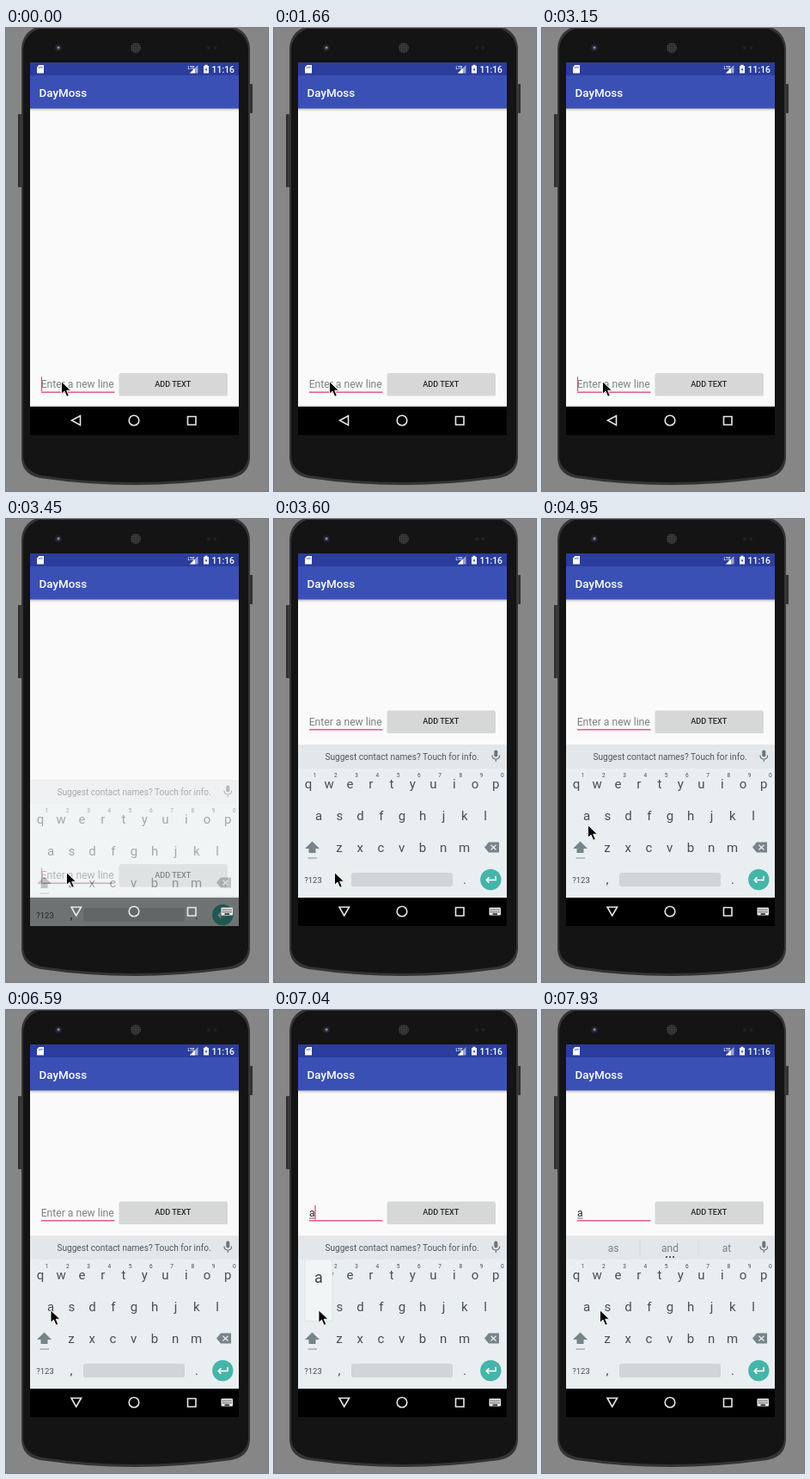
These frames come from a looping animation (305 by 538 pixels, 8 s). An HTML page:

```html
<!DOCTYPE html>
<html lang="en">
<head>
<meta charset="utf-8">
<title>Phone list demo</title>
<style>
  html, body { margin: 0; width: 100%; height: 100%; overflow: hidden; background: #868686; }
  svg { display: block; width: 100vw; height: 100vh; }
  text { font-family: Roboto, sans-serif; white-space: pre; }
  .mid { text-anchor: middle; }
  .medium { font-weight: 500; }
  #nav, .line { fill: none; stroke: #e8e8e8; stroke-width: 1.6; }
</style>
</head>
<body>
<svg viewBox="0 0 305 538">
  <defs>
    <clipPath id="screen"><path d="M28 40H271V473H28Z"/></clipPath>
    <linearGradient id="shade" x2="0" y2="1">
      <stop stop-color="#000" stop-opacity=".25"/>
      <stop offset="1" stop-color="#000" stop-opacity="0"/>
    </linearGradient>
    <pattern id="mesh" width="2" height="2" patternUnits="userSpaceOnUse">
      <path d="M0 0H2V2H0Z" fill="#292929"/><path d="M0 0H1V1H0Z" fill="#565656"/>
    </pattern>
  </defs>

  <!-- Phone -->
  <path d="M0 0H305V538H0Z" fill="#868686"/>
  <path d="M14 100H19V185H14ZM283 65H287V99H283Z" fill="#3a3a3a"/>
  <path d="M15 101V184M286 66V98" stroke="#222"/>
  <path d="M18 500V24Q19 5 36 -1H266Q283 5 284 24V500Q283 519 262 523Q150 539 40 523Q19 519 18 500Z" fill="#343434"/>
  <path d="M20 498V25Q21 8 38 1H264Q281 8 282 25V498Q281 515 261 520Q150 536 41 520Q21 515 20 498Z" fill="#141414"/>
  <circle cx="61" cy="23" r="4" fill="#22222c"/>
  <circle cx="61" cy="23" r="2" fill="#55587c"/>
  <circle cx="61.3" cy="22.6" r=".8" fill="#b0b3cc"/>
  <circle cx="151" cy="23" r="6" fill="url(#mesh)"/>
  <circle cx="236" cy="23" r="2" fill="#271f1f"/>
  <circle cx="243.500" cy="23" r="2" fill="#271f1f"/>

  <g clip-path="url(#screen)">
    <path d="M28 40H271V473H28Z" fill="#fafafa"/>
    <path d="M28 93H271V97H28Z" fill="url(#shade)"/>
    <path d="M28 55H271V93.500H28Z" fill="#3a50b4"/>
    <path d="M28 40H271V55H28Z" fill="#2b3d9d"/>
    <path d="M38.500 43H44V52.500H36V45.500Z" fill="#fff"/>
    <path d="M38.500 45V47M40.300 44.500V47M42 44.500V47" stroke="#2b3d9d" stroke-width=".7"/>
    <path d="M223.500 43V52.500H214Z" fill="#9ba4d2"/>
    <path d="M220 46.500V52.500H214Z" fill="#fff"/>
    <text x="211.500" y="47.500" font-size="5" class="medium" fill="#fff">LTE</text>
    <path d="M230 44H231.500V42.800H234.500V44H236V52.500H230Z" fill="#fff"/>
    <path d="M233.500 45.500L231.700 48.700H233L232.500 51L234.500 47.800H233.200Z" fill="#2b3d9d"/>
    <text x="266" y="52" font-size="10.400" class="medium" fill="#fff" text-anchor="end">11:16</text>
    <text x="38.500" y="80" font-size="13.400" class="medium" fill="#fff">DayMoss</text>

    <!-- Entry row -->
    <g id="entry">
      <text id="hint" x="40.700" y="418.300" font-size="12.150" fill="#808080">Enter a new line</text>
      <g id="typed">
        <text x="41" y="418.300" font-size="12.150" fill="#262626">a</text>
        <path d="M41 420.500H47.500" stroke="#444" stroke-width=".8"/>
      </g>
      <path d="M41 423.300H126.500" stroke="#e8588a" stroke-width="1.400"/>
      <path id="caret" d="M41.500 405.500V422" stroke="#f04a86" stroke-width="1.300"/>
      <rect x="131.500" y="402" width="126.500" height="25.500" rx="1.500" fill="#000" opacity=".14"/>
      <rect x="132" y="401" width="125.500" height="25" rx="1.500" fill="#d6d7d7"/>
      <text x="194.300" y="416.800" font-size="9.200" class="mid medium" fill="#262626">ADD TEXT</text>
    </g>

    <path d="M28 438.500H271V440H28Z" fill="#d8d8d8"/>
    <path d="M28 440H271V473H28Z"/>

    <g id="keyboard">
      <path d="M28 262H271V440H28Z" fill="#e9eef1"/>
      <path d="M28 262H271V290H28Z" fill="#e3e7ea"/>
      <text id="offer" x="149" y="280" font-size="10.150" class="mid" fill="#50585c">Suggest contact names? Touch for info.</text>
      <g id="words" fill="#78838a">
        <text x="83" y="280.500" font-size="12" class="mid">as</text>
        <text x="149" y="280.500" font-size="12" class="mid">and</text>
        <text x="215" y="280.500" font-size="12" class="mid">at</text>
        <path d="M114 267V285M182 267V285" stroke="#d2d7da"/>
        <path d="M144 286H146V288H144ZM148 286H150V288H148ZM152 286H154V288H152Z" fill="#555f64"/>
      </g>
      <rect x="256.300" y="268.500" width="4" height="8" rx="2" fill="#69757b"/>
      <path d="M254 274.500Q254 279 258.300 279T262.600 274.500M258.300 279V282" fill="none" stroke="#69757b" stroke-width="1.200"/>
      <g id="keys" fill="#455056"></g>
      <path d="M44.500 374.500L53 383H48.500V388H40.500V383H36Z" fill="#77848a"/>
      <path d="M39.500 394H50" stroke="#9aa4a9" stroke-width="1.300"/>
      <path d="M245 381.500L250 375.500H262V387.500H250Z" fill="#77848a"/>
      <path d="M252.500 378.700L258.500 384.500M258.500 378.700L252.500 384.500" stroke="#e9eef1" stroke-width="1.300"/>
      <rect x="90" y="411" width="118" height="16" rx="2.500" fill="#cfd5d8"/>
      <circle cx="252.300" cy="419" r="12.200" fill="#46b5a9"/>
      <path d="M258 415V419.500H247.500M250.500 416.300L247.300 419.500L250.500 422.700" class="line" style="stroke:#fff"/>
      <g id="popup">
        <rect x="35.500" y="291" width="33" height="71" rx="2" fill="#dfe4e7"/>
        <rect x="36.500" y="291" width="31" height="70" rx="2" fill="#f2f5f6"/>
        <text x="52" y="317" font-size="18" class="mid" fill="#37434a">a</text>
      </g>
    </g>

    <g id="nav">
      <path id="back" d="M76.500 456L86.500 450.500V461.500Z"/>
      <circle cx="149" cy="456" r="5.800"/>
      <path d="M211.500 451.500H221V461H211.500Z"/>
      <g id="switcher" stroke="none">
        <rect x="250.500" y="451.500" width="13.500" height="9" rx="1" fill="#e8e8e8"/>
        <path d="M252 454.200H262.500M252 456.700H262.500" stroke="#222" stroke-width="1.300" stroke-dasharray="1.300 1"/>
        <path d="M254.500 459H260" stroke="#222"/>
      </g>
    </g>
  </g>

  <path id="pointer" d="M.5 .8V15.300L4 12.100L6.700 18.300L9.300 17.200L6.700 11.200H11.500Z" fill="#000" stroke="#fff" stroke-width=".9"/>
</svg>

<script>
const LOOP = 8000, OPENING = 3450, OPEN = 3600, TYPED = 7040, SUGGESTED = 7190;
const el = id => document.getElementById(id);
const parts = {};
for (const id of ['entry', 'hint', 'typed', 'caret', 'keyboard', 'offer', 'words', 'popup', 'back', 'switcher', 'pointer'])
  parts[id] = el(id);

// Caret starts visible and toggles at each time.
const blinks = [610, 1060, 1660, 2100, 2550, 3150, 3600, 4050, 4500, 5090, 5540, 6140, 6590, 7040, 7490];

// Pointer positions: time, x, y.
const moves = [
  [0, 64, 410], [1810, 66, 410], [1960, 69, 410], [2100, 70, 410],
  [4200, 73, 408], [4350, 71, 397], [4500, 65, 382], [4650, 58, 368],
  [4800, 54, 358], [4950, 53, 355], [5090, 52, 351], [5240, 52, 350],
  [5540, 51.500, 348], [7930, 67, 348]
];

function letter(char, x, y, size) {
  return `<text x="${x}" y="${y}" font-size="${size}" class="mid">${char}</text>`;
}
function keyRow(chars, x, y) {
  return [...chars].map((char, i) => letter(char, x + i * 24.25, y, 15)).join('');
}
el('keys').innerHTML =
  keyRow('qwertyuiop', 40, 313) + keyRow('asdfghjkl', 52, 350) + keyRow('zxcvbnm', 76, 387) +
  [...'1234567890'].map((digit, i) => letter(digit, 47.5 + i * 24.25, 299.5, 6.5)).join('') +
  letter('?123', 45.5, 422.5, 9.5) + letter(',', 76, 423.5, 15) + letter('.', 222, 423.5, 15);

function show(part, visible) {
  part.style.display = visible ? '' : 'none';
}
function place(part, x, y) {
  part.setAttribute('transform', `translate(${x} ${y})`);
}

function render(t) {
  const open = t >= OPEN, opening = t >= OPENING, typed = t >= TYPED;
  const [, x, y] = moves.findLast(move => move[0] <= t);
  place(parts.pointer, x, y);
  place(parts.entry, 0, open ? -178.5 : 0);
  place(parts.keyboard, 0, open ? 0 : 41);
  place(parts.caret, typed ? 6.5 : 0, 0);
  parts.keyboard.setAttribute('opacity', open ? 1 : 0.48);
  parts.back.setAttribute('d', opening ? 'M76 451H87.500L81.700 461Z' : 'M76.500 456L86.500 450.500V461.500Z');
  show(parts.keyboard, opening);
  show(parts.switcher, opening);
  show(parts.caret, blinks.filter(time => time <= t).length % 2 === 0);
  show(parts.hint, !typed);
  show(parts.typed, typed);
  show(parts.offer, t < SUGGESTED);
  show(parts.words, t >= SUGGESTED);
  show(parts.popup, typed && t < SUGGESTED);
}

const start = performance.now();
function tick() {
  render((performance.now() - start) % LOOP);
  requestAnimationFrame(tick);
}
tick();
</script>
</body>
</html>
```
